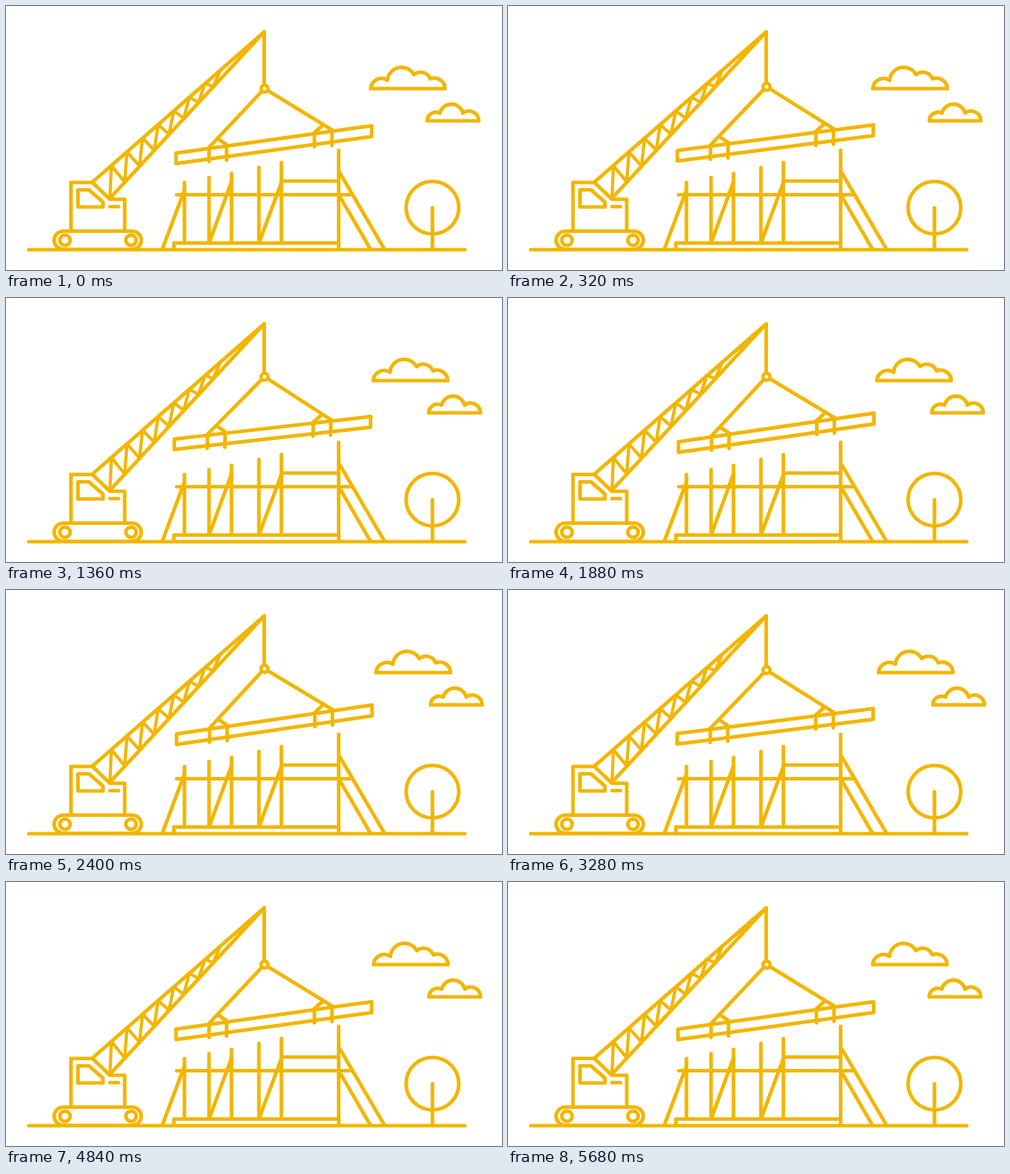
Write an HTML page that moves like this. It is 706 px wide and 377 px high and loops after 5760 ms.

```html
<!DOCTYPE html>
<html lang="en">
<head>
<meta charset="utf-8">
<title>Construction site</title>
<style>
  html, body { margin: 0; width: 100%; height: 100%; overflow: hidden; background: #fff; }
  svg { display: block; width: 100%; height: 100%; fill: none; stroke: #f2b600; stroke-width: 5.2; stroke-linecap: round; stroke-linejoin: round; }
</style>
</head>
<body>
<svg viewBox="0 0 706 377">
  <path d="M32.5 348H653"/>

  <!-- crane -->
  <path d="M92.5 321V252H123L148 276H169V321M102.5 262.5H118L138 280V287H102.5ZM148 286.5H160"/>
  <rect x="68.5" y="321.5" width="124" height="26" rx="13"/>
  <circle cx="84" cy="334.5" r="7.4"/>
  <circle cx="178" cy="334.5" r="7.4"/>
  <path d="M123 251.5L367.5 37L148 274.5"/>
  <path id="lattice" stroke-width="4.5"/>
  <path id="cable"/>

  <!-- frame house -->
  <path d="M239 346V338.5H473M254 252V338M289 245V338M321 239V338M360 230.5V338M392 223.5V338M473.5 206V346"/>
  <path d="M243 269.5H493M393 250H473"/>
  <path d="M223 346L254 263M290 336L321 251M361 336L392 252M475 238L538 346M474 270L518 346"/>

  <!-- tree -->
  <circle cx="607" cy="288" r="37.5"/>
  <path d="M607 288V346"/>

  <!-- clouds -->
  <path id="bigCloud" d="M519 118A15.5 15.5 0 0 1 543 106A20 20 0 0 1 580.5 98A15 15 0 0 1 604 104A15.3 15.3 0 0 1 625 118Z"/>
  <path id="smallCloud" d="M599.5 164A12.5 12.5 0 0 1 617.5 153A17 17 0 0 1 650.5 153A14 14 0 0 1 673 164Z"/>

  <!-- load, relative to the hook -->
  <g id="load">
    <circle r="5" stroke-width="4.8"/>
    <path d="M-126 92L152.5 53V68.5L-126 107Z"/>
    <path d="M-4 4L-79 84V104M-66 72L-54 80V102"/>
    <path d="M5 3L96 59V81M83 52L71 63V83"/>
  </g>
</svg>
<script>
const LOOP = 5760;
const HOOK_X = 368;
const $ = id => document.getElementById(id);

// Keys are [time, value] pairs, joined by sine easing.
const HOOK_Y = [[0, 118], [660, 112.5], [2980, 112.5], [3720, 118]];
const SWING = [[0, 0], [980, 2.1], [2140, -0.75], [3080, 0.8], [3880, 0]];
const DRIFT = [[0, 0], [2960, 1], [3960, 1], [5720, 0]];

function valueAt(keys, t) {
  const i = keys.findIndex(k => k[0] > t);
  if (i < 0) return keys[keys.length - 1][1];
  const [t0, a] = keys[i - 1], [t1, b] = keys[i];
  return a + (b - a) * (1 - Math.cos(Math.PI * (t - t0) / (t1 - t0))) / 2;
}

// Zigzag braces between the two boom chords.
let braces = "";
for (let i = 0; i < 8; i++) {
  const low = 148 + 21 * i, top = 150 + 22.2 * i;
  braces += `${i ? "L" : "M"}${low} ${274 - 1.082 * (low - 148)}L${top} ${228 - 0.881 * (top - 150)}`;
}
$("lattice").setAttribute("d", braces);

function draw(now) {
  const t = now % LOOP;
  const y = valueAt(HOOK_Y, t), drift = valueAt(DRIFT, t);
  $("cable").setAttribute("d", `M367.5 37V${y - 6}`);
  $("load").setAttribute("transform", `translate(${HOOK_X} ${y}) rotate(${valueAt(SWING, t)})`);
  $("bigCloud").setAttribute("transform", `translate(${8.4 * drift} 0)`);
  $("smallCloud").setAttribute("transform", `translate(${5.2 * drift} 0)`);
}

const start = performance.now();
function tick() {
  draw(performance.now() - start);
  requestAnimationFrame(tick);
}
tick();
</script>
</body>
</html>
```
